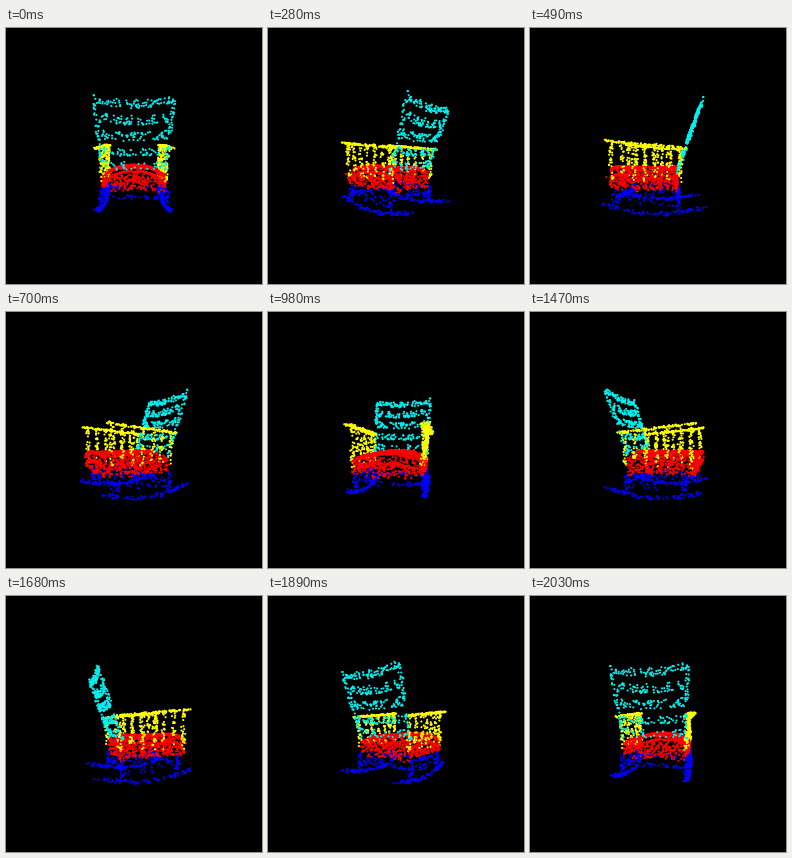
Recreate the animation shown at these times as a matplotlib script. Size 256x256 px, loop 2.1 s.

```python
import numpy as np
import matplotlib.pyplot as plt
from matplotlib.animation import FuncAnimation

SIZE, DPI = 256, 100
FRAMES, STEP_MS = 30, 70
CAMERA = 200
CYAN, YELLOW, RED, BLUE = "#00f0f0", "#ffff00", "#ff0000", "#0000ff"

rng = np.random.default_rng(7)


def cloud(n, x, back, z, spread=0.6):
    """Scatter n points; x, back and z are numbers or arrays of n values."""
    pts = np.column_stack([np.broadcast_to(v, n) for v in (x, back, z)])
    return pts + rng.uniform(-spread, spread, (n, 3))


def uni(lo, hi, n):
    return rng.uniform(lo, hi, n)


def lean(z):
    return 20 + 21 * (z + 12) / 60


def half_width(z):
    return 29 + 3 * (z + 12) / 60


def arm_height(b):
    return 6.5 + 6.5 * (27 - b) / 68


def backrest():
    parts = []
    for side in (-1, 1):
        z = uni(-14, 48, 45)
        parts.append(cloud(45, side * half_width(z), lean(z), z, 1.4))
    for level, n in zip((43, 30.5, 17.5, 4, -8.5), (80, 75, 70, 55, 40)):
        u = uni(-1, 1, n)
        z = level + uni(-3.4, 3.4, n) + 2 * u**2 - 1
        parts.append(cloud(n, u * half_width(z), lean(z), z, 0.9))
    return np.vstack(parts)


def arms():
    parts = []
    for side in (-1, 1):
        b = uni(-42, 27, 95)
        parts.append(cloud(95, side * uni(28, 36, 95), b, arm_height(b), 0.8))
        for b in np.linspace(-38, 22, 7):
            n, foot = (32, -27) if b < -30 else (21, -22)
            t = uni(0, 1, n) ** 0.85
            z = foot + t * (arm_height(b) - foot)
            parts.append(cloud(n, side * (28.5 + 2.5 * t), b, z, 1.7))
    return np.vstack(parts)


def seat_top(x):
    return -11 - 8 * np.abs(x / 30) ** 3


def seat():
    x = uni(-30, 30, 360)
    parts = [cloud(360, x, uni(-42, 20, 360), seat_top(x), 0.8)]
    for drop, n in ((0, 90), (8, 90)):
        x = uni(-29, 29, n)
        parts.append(cloud(n, x, -42 + 3 * (x / 29) ** 4, seat_top(x) - drop, 0.8))
    for side in (-1, 1):
        z = uni(-29, -18, 85)
        parts.append(cloud(85, side * 29, uni(-40, 20, 85), z, 1))
    for b in (-38, 19):
        parts.append(cloud(50, uni(-29, 29, 50), b, uni(-32, -16, 50)))
    parts.append(cloud(150, uni(-27, 27, 150), uni(-38, 20, 150), uni(-32, -20, 150)))
    return np.vstack(parts)


def base():
    parts = []
    for side in (-1, 1):
        b = uni(-45, 42, 75)
        z = -49 + 7 * (b / 43) ** 2
        parts.append(cloud(75, side * 30.5, b, z, 1.6))
        for b in (-32, 20):
            parts.append(cloud(18, side * 29.5, b, uni(-46, -29, 18), 2))
        parts.append(cloud(38, side * 29, uni(-40, 24, 38), uni(-42, -30, 38), 1.5))
    for b in (-32, 20):
        parts.append(cloud(26, uni(-28, 28, 26), b, -37, 1.8))
    return np.vstack(parts)


groups = [(backrest(), CYAN), (arms(), YELLOW), (seat(), RED), (base(), BLUE)]
points = np.vstack([p for p, _ in groups])
colors = np.concatenate([[c] * len(p) for p, c in groups])

fig = plt.figure(figsize=(SIZE / DPI, SIZE / DPI), dpi=DPI, facecolor="black")
ax = fig.add_axes([0, 0, 1, 1])
ax.set(xlim=(0, SIZE), ylim=(SIZE, 0))
ax.axis("off")
dots = ax.scatter(points[:, 0], points[:, 1], s=2.3, c=colors, linewidths=0)


def draw(i):
    turn = 2 * np.pi * i / FRAMES
    x, b, z = points.T
    side = x * np.cos(turn) + b * np.sin(turn)
    near = b * np.cos(turn) - x * np.sin(turn)
    scale = CAMERA / (CAMERA - near)
    order = np.argsort(near)
    screen = np.column_stack([SIZE / 2 + side * scale, SIZE / 2 - z * scale])
    dots.set_offsets(screen[order])
    dots.set_facecolor(colors[order])
    return (dots,)


anim = FuncAnimation(fig, draw, frames=FRAMES, interval=STEP_MS, repeat=True, repeat_delay=0)
plt.show()
```
